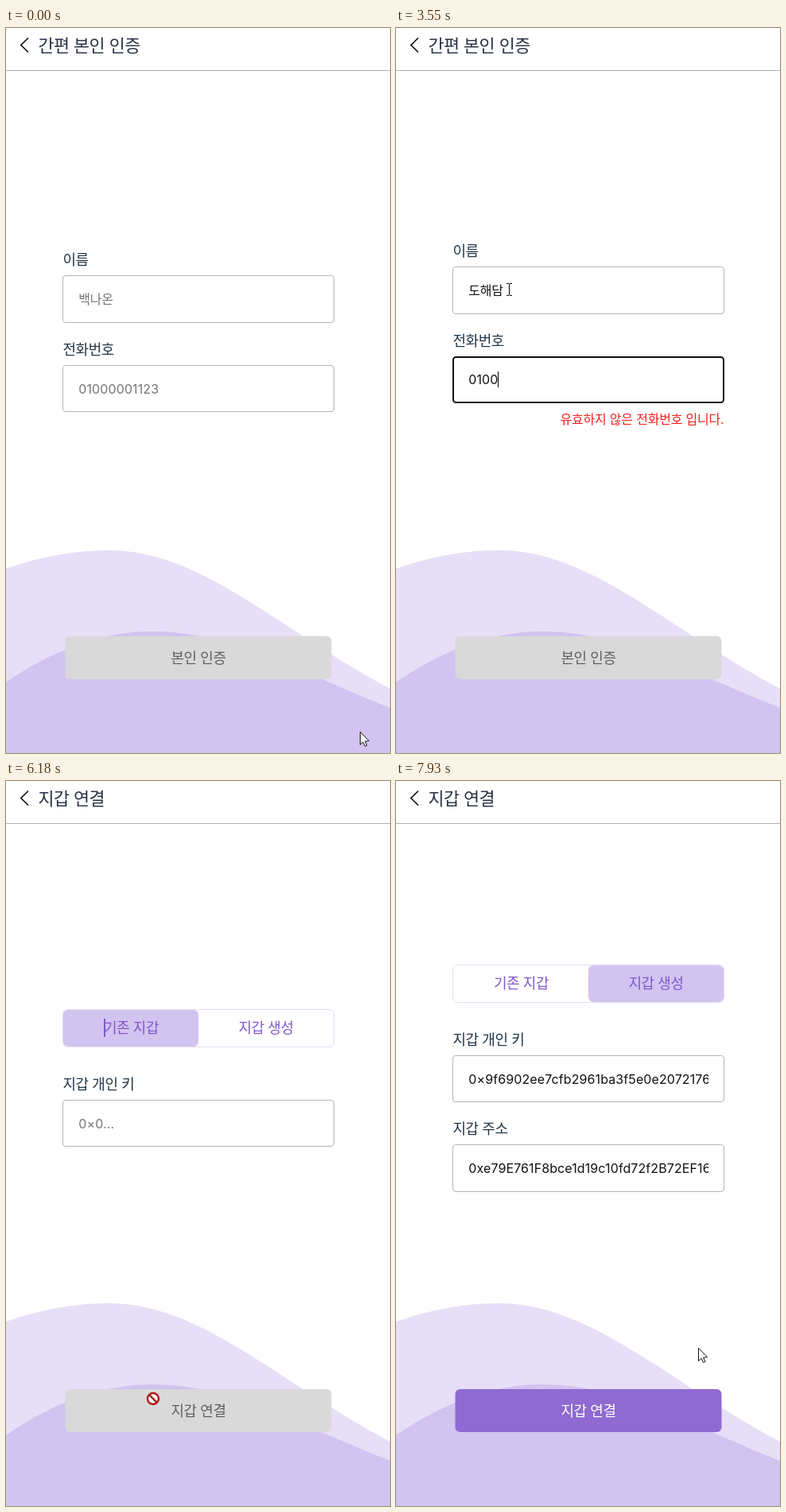
Write an HTML page with a canvas that moves like this. It is 483 by 912 pixels and loops after 8 s.

```html
<!DOCTYPE html>
<html lang="ko">
<head>
<meta charset="utf-8">
<title>본인 인증</title>
<style>
html, body { margin: 0; width: 100%; height: 100%; overflow: hidden; background: #fff; }
canvas { display: block; width: 483px; height: 912px; }
</style>
</head>
<body>
<canvas id="stage" width="483" height="912"></canvas>
<script>
const ctx = document.getElementById('stage').getContext('2d');
const LOOP = 8000, FADE = 400;
const INK = '#213547', HINT = '#757575', VIOLET = '#7f58cd', LILAC = '#d2c4f0';
const GRAY = [217, 217, 217], PURPLE = [142, 106, 210];

const NAME_HINT = '백나온', PHONE_HINT = '01000001123', PHONE = '01000009839';
const NAME_STEPS = ['ㄷ', '도', '돟', '도해', '도핻', '도해다', '도해담'];
const KEY = '0×9f6902ee7cfb2961ba3f5e0e2072176';
const ADDRESS = '0xe79E761F8bce1d19c10fd72f2B72EF16';

// steady typing; the phone number has a pause after its third digit
const nameKey = i => 1050 + 126 * i;
const phoneKey = i => 2850 + 185 * i + (i > 2 ? 145 : 0);

const NAME_FOCUS = 540, PHONE_FOCUS = 2030, VALID = phoneKey(PHONE.length - 1);
const SUBMIT = 5900, WALLET = 6180, TAB_PRESS = 7090, CREATED = 7480;
const CLICKS = [NAME_FOCUS, SUBMIT, TAB_PRESS], CLICK_TIME = 130;

const HOME = { x: 445, y: 885 };
const MOVES = [
  { from: 30, to: 370, x: 142, y: 329 },
  { from: 5350, to: 5830, x: 185, y: 777 },
  { from: 6200, to: 7040, x: 350, y: 317 },
  { from: 7640, to: 7930, x: 380, y: 713 }
];

const clamp = v => Math.min(1, Math.max(0, v));
const smooth = k => k * k * (3 - 2 * k);
const easeOut = k => 1 - (1 - clamp(k)) ** 2.2;
const mix = (a, b, k) => `rgb(${a.map((v, i) => Math.round(v + (b[i] - v) * k))})`;
const blink = age => Math.floor(age / 510) % 2 === 0;
const inside = (p, x, y, w, h) => p.x >= x && p.x <= x + w && p.y >= y && p.y <= y + h;

function typed(key, total, t) {
  let n = 0;
  while (n < total && key(n) <= t) n++;
  return n;
}

function text(s, x, y, size, color, align = 'left', gap = -.025 * size) {
  ctx.font = `${size}px Inter, "Noto Sans CJK KR", "Noto Sans CJK", sans-serif`;
  ctx.letterSpacing = gap + 'px';
  ctx.textAlign = align;
  ctx.fillStyle = color;
  ctx.fillText(s, x, y);
}

function box(x, y, w, h, r, fill, stroke, line = 1) {
  ctx.beginPath();
  ctx.roundRect(x, y, w, h, r);
  ctx.fillStyle = fill;
  ctx.fill();
  if (!stroke) return;
  ctx.strokeStyle = stroke;
  ctx.lineWidth = line;
  ctx.stroke();
}

function line(color, width, ...points) {
  ctx.beginPath();
  points.forEach(p => ctx.lineTo(...p));
  ctx.strokeStyle = color;
  ctx.lineWidth = width;
  ctx.stroke();
}

function field({ y, h, base, value = '', hint = '', focus, caret }) {
  if (focus) box(72, y + 1, 340, h - 2, 3.5, '#fff', '#101010', 2);
  else box(71.5, y + .5, 341, h - 1, 3.5, '#fff', '#b4b4b4');
  const shown = value || hint;
  ctx.save();
  ctx.beginPath();
  ctx.rect(91, y, 302, h);
  ctx.clip();
  text(shown, 91.3, base, 16, value ? '#111' : HINT, 'left', /[가-힣]/.test(shown) ? -.3 : .1);
  const end = value ? ctx.measureText(value).width : 0;
  ctx.restore();
  if (caret) {
    ctx.fillStyle = '#000';
    ctx.fillRect(Math.round(91 + end), base - 16, 1, 20);
  }
}

function button(label, k) {
  box(74.5, 765, 335, 54, 6, mix(GRAY, PURPLE, k));
  text(label, 242, 799, 18, k > 0 ? '#fff' : '#606060', 'center');
}

function backdrop(title) {
  ctx.fillStyle = '#fff';
  ctx.fillRect(0, 0, 483, 912);
  ctx.fillStyle = '#e7dff7';
  ctx.fill(new Path2D('M0 680C45 664 90 657 130 657C246 657 345 758 483 831V912H0Z'));
  ctx.fillStyle = '#d2c3f0';
  ctx.fill(new Path2D('M0 823C60 782 120 759 185 759C285 759 380 815 483 855V912H0Z'));
  ctx.fillStyle = '#b0b0b0';
  ctx.fillRect(0, 53, 483, 1);
  line('#000', 1.5, [28, 12.5], [18.8, 21.5], [28, 30.5]);
  text(title, 40.5, 29.5, 21.8, '#2a3244');
}

function identityPage(t) {
  const n = typed(nameKey, NAME_STEPS.length, t), d = typed(phoneKey, PHONE.length, t);
  const error = d > 0 && t < VALID, up = error ? 11 : 0;
  const onName = t >= NAME_FOCUS && t < PHONE_FOCUS;
  const onPhone = t >= PHONE_FOCUS && t < SUBMIT;
  backdrop('간편 본인 인증');
  text('이름', 71.5, 298 - up, 18, INK);
  field({
    y: 311 - up, h: 60, base: 347 - up, value: n ? NAME_STEPS[n - 1] : '', hint: NAME_HINT,
    focus: onName, caret: onName && blink(t - (n ? nameKey(n - 1) : NAME_FOCUS))
  });
  text('전화번호', 71.5, 411 - up, 18, INK);
  field({
    y: 424 - up, h: 59, base: error ? 448 : 460, value: PHONE.slice(0, d), hint: PHONE_HINT,
    focus: onPhone, caret: onPhone && blink(t - (d ? phoneKey(d - 1) : PHONE_FOCUS))
  });
  if (error) text('유효하지 않은 전화번호 입니다.', 412.5, 498, 16, '#f5201c', 'right', -.2);
  button('본인 인증', easeOut((t - VALID) / FADE));
}

function walletPage(t) {
  const made = t >= CREATED, up = made ? 56 : 0, pressed = t >= TAB_PRESS;
  backdrop('지갑 연결');
  box(71.5, 287.5 - up, 341, 47, 5.5, '#fff', '#e3dcf4');
  box(made ? 242 : 72, 288 - up, 170, 46, 6, LILAC);
  text('기존 지갑', 157.5, 317 - up, 18, VIOLET, 'center');
  text('지갑 생성', 327, 317 - up, 18, VIOLET, 'center');
  if (blink(t - (pressed ? TAB_PRESS : WALLET))) {
    ctx.fillStyle = VIOLET;
    ctx.fillRect(pressed ? 345 : 123, 299 - up, pressed ? 1 : 2, 23);
  }
  text('지갑 개인 키', 71.5, 388 - up, 18, INK);
  field({ y: 401 - up, h: 59, base: 437 - up, value: made ? KEY : '', hint: '0×0...' });
  if (made) {
    text('지갑 주소', 71.5, 444, 18, INK);
    field({ y: 457, h: 60, base: 493, value: ADDRESS });
  }
  button('지갑 연결', easeOut((t - CREATED) / FADE));
}

function pointerAt(t) {
  return MOVES.reduce((p, m) => {
    const k = smooth(clamp((t - m.from) / (m.to - m.from)));
    return { x: p.x + (m.x - p.x) * k, y: p.y + (m.y - p.y) * k };
  }, HOME);
}

function pointerKind(p, t) {
  const wallet = t >= WALLET, made = t >= CREATED;
  if (inside(p, 75, 765, 335, 54)) return (wallet ? made : t >= VALID) ? 'hand' : 'blocked';
  if (wallet && inside(p, 71, made ? 231 : 287, 342, 48)) return 'hand';
  const rows = !wallet ? [311, 424] : made ? [345, 457] : [401];
  return rows.some(y => inside(p, 71, y, 342, 59)) ? 'beam' : 'arrow';
}

const pointers = {
  arrow() {
    ctx.translate(.5, .5);
    ctx.fillStyle = '#fff';
    ctx.strokeStyle = '#111';
    ctx.lineWidth = 1;
    const outline = new Path2D('M0 0V16L3.6 12.8L6 18L8.4 17L6.1 11.8L11 11.3Z');
    ctx.fill(outline);
    ctx.stroke(outline);
  },
  beam() {
    line('#000', 1, [.5, -7], [.5, 7]);
    for (const y of [-7.5, 7.5]) {
      line('#000', 1, [-3, y], [0, y]);
      line('#000', 1, [1, y], [4, y]);
    }
  },
  hand() {
    const outline = new Path2D();
    outline.roundRect(-1, 0, 4, 16, 2);
    outline.roundRect(-4, 9, 16, 14.5, [3, 4, 6, 7]);
    ctx.strokeStyle = '#111';
    ctx.lineWidth = 2;
    ctx.stroke(outline);
    ctx.fillStyle = '#fff';
    ctx.fill(outline);
    for (let x = 3; x < 10; x += 3) line('#111', 1, [x, 8], [x, 12]);
  },
  blocked() {
    ctx.beginPath();
    ctx.arc(0, 0, 7, 0, 7);
    ctx.fillStyle = '#fff';
    ctx.fill();
    ctx.strokeStyle = '#b01a1a';
    ctx.lineWidth = 2.4;
    ctx.stroke();
    line('#b01a1a', 2.4, [-4.8, -4.8], [4.8, 4.8]);
  }
};

function pointer(t) {
  const p = pointerAt(t);
  ctx.save();
  ctx.translate(Math.round(p.x), Math.round(p.y));
  if (CLICKS.some(c => t >= c && t < c + CLICK_TIME)) {
    ctx.beginPath();
    ctx.arc(0, 0, 15.5, 0, 7);
    ctx.fillStyle = 'rgba(255, 247, 20, .55)';
    ctx.fill();
  }
  pointers[pointerKind(p, t)]();
  ctx.restore();
}

const start = performance.now();

function draw() {
  const t = Math.max(0, performance.now() - start) % LOOP;
  (t < WALLET ? identityPage : walletPage)(t);
  pointer(t);
  requestAnimationFrame(draw);
}

draw();
</script>
</body>
</html>
```
